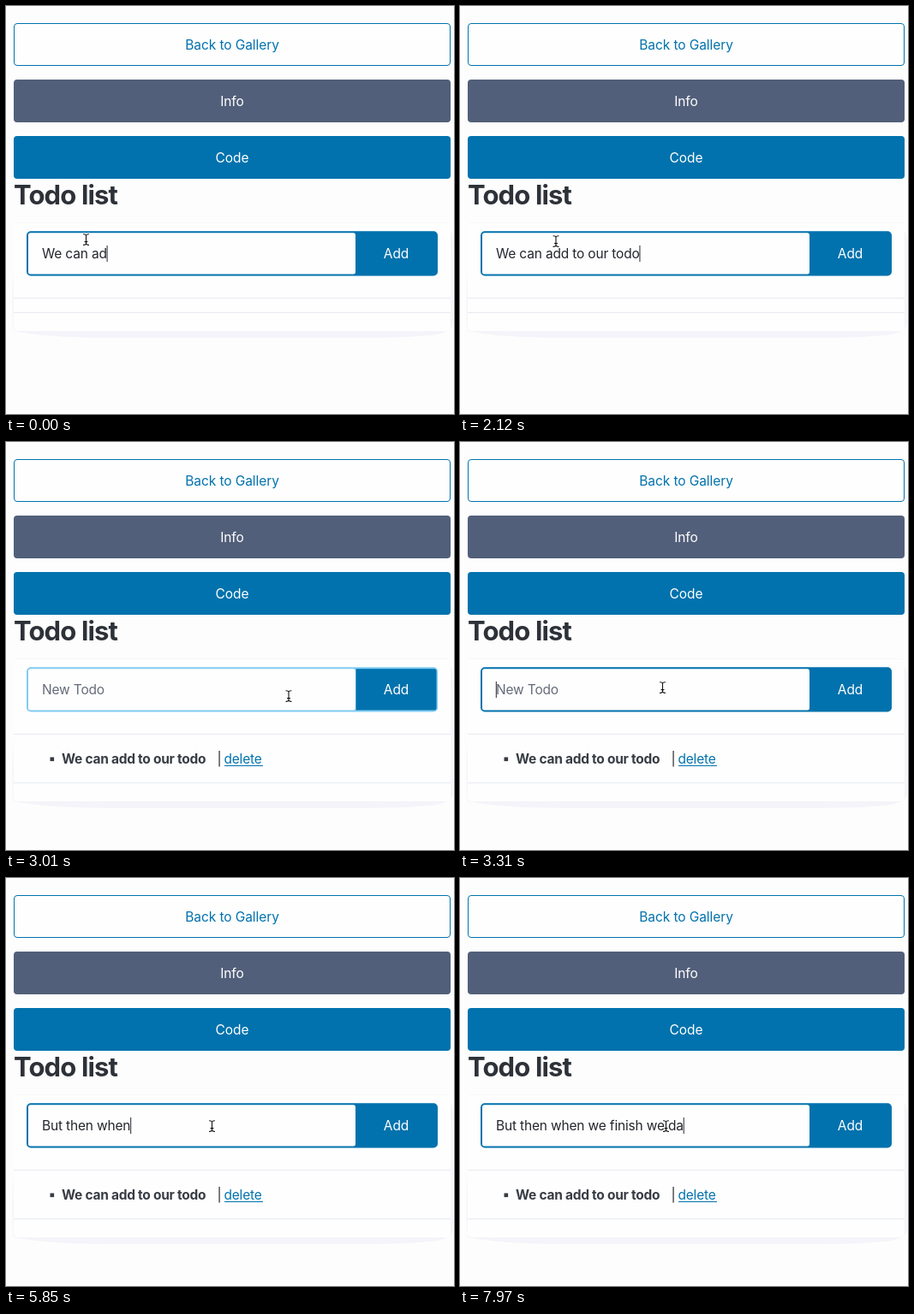
These frames come from a looping animation (523x477 px, 8000 ms). An HTML page:

```html
<!DOCTYPE html>
<html lang="en">
<head>
<meta charset="utf-8">
<title>Todo list</title>
<style>
  html, body { margin: 0; width: 100%; height: 100%; overflow: hidden; background: #fdfdfd; }
  svg { display: block; width: 523px; height: 477px; }
  text { font: 400 15.5px Inter, Roboto, sans-serif; letter-spacing: -.17px; fill: #23262c; white-space: pre; }
  .btn { text-anchor: middle; letter-spacing: -.08px; fill: #fff; }
  .link { fill: #0172ad; }
  .title { font-size: 31px; font-weight: 700; letter-spacing: -.85px; fill: #2d3138; }
  .item { font-weight: 700; letter-spacing: -.27px; fill: #373c44; }
  .hint { fill: #646b79; }
  .rule { fill: #e7eaf0; }
</style>
</head>
<body>
<svg viewBox="0 0 523 477">
  <rect x="9.5" y="20.5" width="509" height="49" rx="3.5" fill="#fefefe" stroke="#0172ad"/>
  <rect x="9" y="86" width="510" height="50" rx="4" fill="#525f7a"/>
  <rect x="9" y="152" width="510" height="50" rx="4" fill="#0172ad"/>
  <text class="btn link" x="264" y="51">Back to Gallery</text>
  <text class="btn" x="264" y="117">Info</text>
  <text class="btn" x="264" y="183">Code</text>
  <text class="title" x="9" y="232">Todo list</text>

  <path id="shadow" fill="#f4f4fa"/>
  <rect id="card" x="9" y="253" width="510" rx="4" fill="#fefefe"/>
  <rect x="11" y="253" width="506" height="1" fill="#f7f7f9"/>
  <rect class="rule" x="9" y="341" width="510" height="1"/>
  <rect class="rule" id="footLine" x="9" width="510" height="1"/>

  <rect id="ring" x="24" y="263.3" width="480" height="52.2" rx="5"/>
  <rect id="field" x="26" y="265.3" width="382" height="48.2" rx="2.5" fill="#fefefe"/>
  <path id="add" d="M408.5 265.3H500a2.5 2.5 0 0 1 2.5 2.5V311a2.5 2.5 0 0 1-2.5 2.5H408.5Z"/>
  <text class="btn" x="455.5" y="295">Add</text>
  <text class="hint" id="hint" x="42" y="295">New Todo</text>
  <text id="typed" x="42" y="295"></text>
  <rect id="caret" y="280" width="1" height="19" fill="#23262c"/>

  <g id="list">
    <rect x="51.5" y="368.5" width="4.6" height="4.6" fill="#373c44"/>
    <text class="item" x="65" y="376">We can add to our todo</text>
    <text x="246.6" y="376">|</text>
    <text class="link" x="254.4" y="376">delete</text>
    <rect x="255" y="378" width="45" height="1" fill="#0172ad"/>
  </g>

  <g id="beam" fill="none" stroke-linecap="round">
    <path id="beamShape" d="M-3 -6.2Q-.4 -6.2 0 -4.8Q.4 -6.2 3 -6.2M0 -4.8V5M-3 6.4Q-.4 6.4 0 5Q.4 6.4 3 6.4M-1.5 2.6H1.5" stroke="#fff" stroke-width="2.6"/>
    <use href="#beamShape" id="beamInk"/>
    <path d="M-3 -6.2Q-.4 -6.2 0 -4.8Q.4 -6.2 3 -6.2M0 -4.8V5M-3 6.4Q-.4 6.4 0 5Q.4 6.4 3 6.4M-1.5 2.6H1.5" stroke="#111" stroke-width="1.1"/>
  </g>
  <g id="hand">
    <path d="M-4.6 -6.6C-4.8 -8.6 -2.3 -8.8 -1.9 -6.8L-1 -2.8C-.4 -3.9 1.2 -3.8 1.5 -2.6C2.2 -3.5 3.8 -3.2 4 -2C5 -2.6 6.4 -2 6.5 -.6C6.8 2 6.5 3.8 5.3 6V8.2H-1.6V6.6C-3.2 4.6 -4.4 3 -6 .8C-7 -.7 -5.2 -1.9 -3.9 -.7L-3 .2Z" fill="#fff" stroke="#111" stroke-width="1.1" stroke-linejoin="round"/>
    <path d="M-.9 3V6M1.5 3V6M3.8 3V6" stroke="#111" stroke-width=".9"/>
  </g>
</svg>
<script>
const $ = id => document.getElementById(id);
const LOOP = 8000, BLUE = '#0172ad', FIRST = 'We can add to our todo', SECOND = 'But then when we finish we da';

// [time, text, characters shown]
const typing = [
  [0, FIRST, 9], [300, FIRST, 10], [450, FIRST, 11], [600, FIRST, 13], [750, FIRST, 14],
  [900, FIRST, 15], [1050, FIRST, 18], [1200, FIRST, 20], [1350, FIRST, 21], [1500, FIRST, 22],
  [2720, '', 0],
  [4070, SECOND, 1], [4350, SECOND, 2], [4500, SECOND, 3], [4650, SECOND, 4], [4800, SECOND, 5],
  [4950, SECOND, 7], [5250, SECOND, 8], [5400, SECOND, 9], [5550, SECOND, 10], [5700, SECOND, 11],
  [5850, SECOND, 13], [6000, SECOND, 14], [6300, SECOND, 15], [6450, SECOND, 17], [6750, SECOND, 19],
  [6900, SECOND, 20], [7050, SECOND, 22], [7240, SECOND, 24], [7520, SECOND, 25], [7670, SECOND, 26],
  [7820, SECOND, 27], [7970, SECOND, 29]
];
// [time, x, y, shape]
const pointer = [
  [0, 93.5, 273, 'beam'], [1980, 112, 275, 'beam'], [2130, 230, 288, 'beam'], [2280, 370, 302, 'beam'],
  [2420, 446, 307, 'hand'], [2570, 452.5, 307.5, 'hand'],
  [3010, 330, 297, 'beam'], [3160, 240, 288, 'beam'], [3310, 236.5, 287, 'beam'], [3460, 240.5, 290, 'beam']
];
// [time, focused part, caret visible]
const focus = [[0, 'field', 1], [2720, 'button', 0], [3310, 'field', 1], [3760, 'field', 0], [4070, 'field', 1]];

const at = (steps, t) => steps.findLast(s => s[0] <= t);
const show = (id, on) => $(id).setAttribute('visibility', on ? 'visible' : 'hidden');
const set = (id, name, value) => $(id).setAttribute(name, value);

function drawCard(open) {
  const b = open ? 420 : 380;
  set('card', 'height', b - 253);
  set('footLine', 'y', b - 22);
  set('shadow', 'd', `M518 262Q523 264 522 290V${b - 10}Q522 ${b + 1} 500 ${b + 4.5}Q465 ${b + 8} 410 ${b + 8}` +
    `H120Q45 ${b + 7.5} 9 ${b}Q7.5 ${b - 10} 7.5 ${b - 40}L9 ${b - 75}Z`);
  show('list', open);
}

function draw(t) {
  const [, text, count] = at(typing, t);
  const [, x, y, shape] = at(pointer, t);
  const [, part, caret] = at(focus, t);
  drawCard(t >= 2720);

  $('typed').textContent = text.slice(0, count);
  show('hint', !count);
  set('caret', 'x', 41.8 + (count ? $('typed').getComputedTextLength() : 0));
  show('caret', caret);

  set('ring', 'fill', part === 'field' ? BLUE : '#80ccf3');
  set('add', 'fill', shape === 'hand' ? '#02659a' : BLUE);
  for (const id of ['beam', 'hand']) show(id, id === shape);
  set(shape, 'transform', `translate(${x} ${y})`);
}

$('beamInk').remove();
const start = performance.now();
function tick() {
  draw((performance.now() - start) % LOOP);
  requestAnimationFrame(tick);
}
tick();
</script>
</body>
</html>
```
